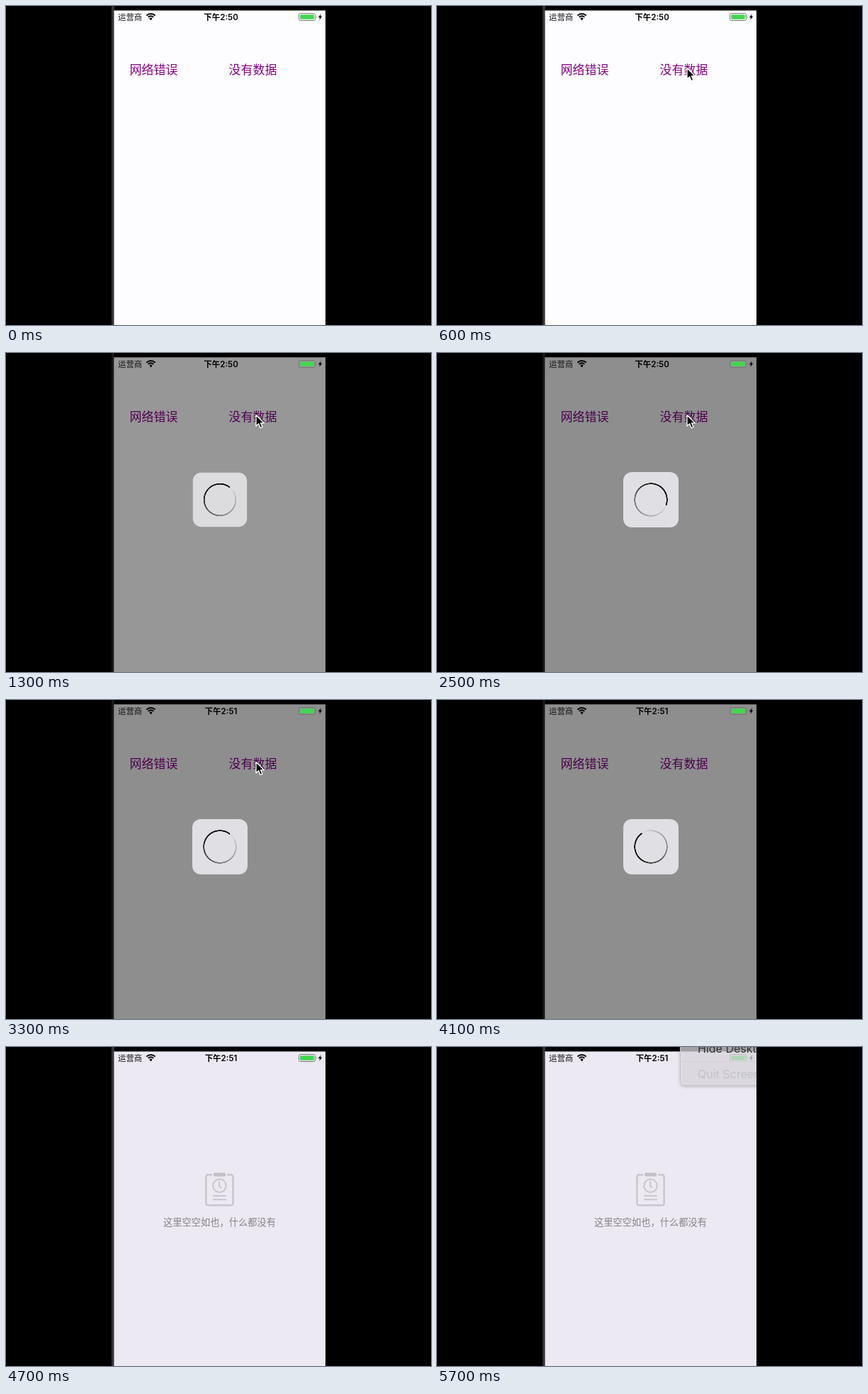
Recreate the animation shown at these times as an HTML page. Size 600 by 450 pixels, loop 5.8 s.

```html
<!DOCTYPE html>
<html lang="zh-CN">
<head>
<meta charset="utf-8">
<title>空数据页面</title>
<style>
  html, body { margin: 0; width: 100%; height: 100%; overflow: hidden; background: #000; }
  svg { position: absolute; left: 0; top: 0; display: block; }
  text { font-family: Inter, "Noto Sans CJK SC", "Noto Sans CJK", sans-serif; }
  .cjk { font-family: "Noto Sans CJK SC", "Noto Sans CJK", sans-serif; }
  #hud { position: absolute; left: 262.5px; top: 167.5px; width: 78px; height: 78px; border-radius: 12px; }
  #ring {
    position: absolute; left: 15px; top: 15px; width: 48px; height: 48px; border-radius: 50%;
    background: conic-gradient(rgba(0,0,0,0), rgba(0,0,0,.14) 40deg, rgba(0,0,0,.48) 155deg, rgba(0,0,0,.92) 255deg, #000 360deg);
    -webkit-mask: radial-gradient(circle, transparent 21.6px, #000 22.1px, #000 23.6px, transparent 24px);
    mask: radial-gradient(circle, transparent 21.6px, #000 22.1px, #000 23.6px, transparent 24px);
  }
</style>
</head>
<body>
<svg width="600" height="450" viewBox="0 0 600 450">
  <rect width="600" height="450"/>
  <rect id="bezel" x="149" y="0" width="4" height="450"/>
  <rect id="page" x="152.5" y="6" width="298.5" height="444"/>
  <g id="buttons" class="cjk" font-size="17" fill="#800080">
    <text class="cjk" x="174.5" y="96">网络错误</text>
    <text class="cjk" x="314.5" y="96">没有数据</text>
  </g>
  <g id="empty">
    <g fill="none" stroke="#c9c6cd" stroke-width="2.4" stroke-linecap="round">
      <path d="M290 180.2H285.5Q282.4 180.2 282.4 183.3V220.2Q282.4 223.3 285.5 223.3H317.5Q320.6 223.3 320.6 220.2V183.3Q320.6 180.2 317.5 180.2H313"/>
      <circle cx="301.5" cy="195.7" r="9.3" stroke-width="2"/>
      <path d="M301 190V196L303.6 198.6M293 210H310M293 215.2H310" stroke-width="2"/>
    </g>
    <rect x="293" y="177.4" width="17" height="5" rx="1.5" fill="#c3c0c7"/>
    <text class="cjk" x="222" y="252" font-size="13.25" fill="#858388">这里空空如也，什么都没有</text>
  </g>
  <rect id="dim" x="152.5" y="6" width="298.5" height="444"/>
  <path d="M152.5 6.5H451" stroke="#666" stroke-opacity=".6"/>
  <g id="status">
    <text class="cjk" x="158" y="19.8" font-size="11.4" fill="#111">运营商</text>
    <g id="wifi" fill="none" stroke="#000" stroke-width="2"></g>
    <text id="clock" x="303.5" y="19.8" font-size="11.5" font-weight="600" text-anchor="middle"></text>
    <rect x="413.5" y="10.5" width="23" height="10" rx="2.2" fill="none" stroke="#777"/>
    <rect x="415.2" y="12.2" width="19.6" height="6.6" rx="1" fill="#43d552"/>
    <path d="M438 13.8Q439.8 15.5 438 17.2Z" fill="#777"/>
    <path d="M444.8 11L440.8 16.2H443.2L442.2 20L446.3 14.6H443.9Z"/>
  </g>
</svg>
<div id="hud"><div id="ring"></div></div>
<svg width="600" height="450" viewBox="0 0 600 450">
  <defs>
    <clipPath id="crop"><rect x="149" width="302" height="450"/></clipPath>
    <filter id="soft" x="-10%" y="-20%" width="120%" height="150%"><feGaussianBlur stdDeviation="2.5"/></filter>
  </defs>
  <g id="menu" clip-path="url(#crop)">
    <rect x="343" y="-20" width="130" height="76" rx="6" fill="#555" opacity=".3" filter="url(#soft)"/>
    <rect x="343.5" y="-20" width="130" height="74" rx="5" fill="#ebe9ef" fill-opacity=".66" stroke="#c6c4ca"/>
    <path d="M344 20.5H451" stroke="#d2d0d6"/>
    <text x="368" y="8" font-size="16" fill="#333">Hide Desktop</text>
    <text x="368" y="43.5" font-size="16" fill="#c2c0c8">Quit Screen</text>
  </g>
  <g id="cursor">
    <path d="M0 0V15.6L3.6 12.3L6.2 18.2L8.9 17L6.4 11.3H11.2Z" stroke="#fff" stroke-width="1.3" stroke-linejoin="round"/>
  </g>
</svg>
<script>
const LOOP = 5800, FRAME = 100;
const $ = id => document.getElementById(id);
const set = (id, attrs) => { for (const k in attrs) $(id).setAttribute(k, attrs[k]); };
const show = (id, on) => { $(id).style.display = on ? '' : 'none'; };

// Held values: [start ms, value]
const BEZEL = [[0, '#333335'], [700, '#171718'], [4700, '#333335']];
const PAGE = [[0, '#fdfcff'], [4200, '#ece9f3']];
const DIM = [[0, 0], [1200, .012], [1300, .405], [1400, .44], [4200, 0]];
const SCALE = [[0, 2 / 3], [1300, .98], [1400, 1]];
const FILL = [[0, 'rgba(255,255,255,.55)'], [1300, '#dcdbde'], [1400, '#e0dfe3']];
const RING = [[0, .05], [1300, 1]];
const CLOCK = [[0, '下午2:50'], [3300, '下午2:51']];
const MENU = [[0, 0], [5600, .85], [5700, 1]];

// Pointer path: [ms, x, y]
const PATH = [[100, 428, 205], [300, 396, 160], [600, 353, 87.5],
  [3300, 353, 87.5], [3600, 381, 40], [3800, 398, 8]];

const held = (table, t) => table.reduce((v, [at, x]) => t >= at ? x : v, null);

function along(path, t) {
  let i = 1;
  while (i < path.length - 1 && t > path[i][0]) i++;
  const [t0, x0, y0] = path[i - 1], [t1, x1, y1] = path[i];
  const u = (t - t0) / (t1 - t0), e = u * u * (3 - 2 * u);
  return [x0 + (x1 - x0) * e, y0 + (y1 - y0) * e];
}

$('wifi').innerHTML = [8.6, 5.3, 2].map(r => {
  const d = r * Math.SQRT1_2;
  return `<path d="M${204.5 - d} ${19.6 - d}A${r} ${r} 0 0 1 ${204.5 + d} ${19.6 - d}"/>`;
}).join('') + '<path d="M204.5 20.3L202.6 18.2H206.4Z" fill="#000" stroke="none"/>';

function draw(t) {
  const empty = t >= 4200, pointer = t >= 100 && t < 3800;
  set('bezel', { fill: held(BEZEL, t) });
  set('page', { fill: held(PAGE, t) });
  set('dim', { opacity: held(DIM, t) });
  set('menu', { opacity: held(MENU, t) });
  $('clock').textContent = held(CLOCK, t);
  show('buttons', !empty);
  show('empty', empty);
  show('hud', t >= 1200 && !empty);
  $('hud').style.transform = `scale(${held(SCALE, t)})`;
  $('hud').style.background = held(FILL, t);
  $('ring').style.opacity = held(RING, t);
  $('ring').style.transform = `rotate(${2 + (t - 1200) * .36}deg)`;
  show('cursor', pointer);
  if (pointer) set('cursor', { transform: `translate(${along(PATH, t)})` });
}

const start = performance.now();
function tick() {
  const t = (performance.now() - start) % LOOP;
  draw(Math.floor(t / FRAME) * FRAME);
  requestAnimationFrame(tick);
}
tick();
</script>
</body>
</html>
```
